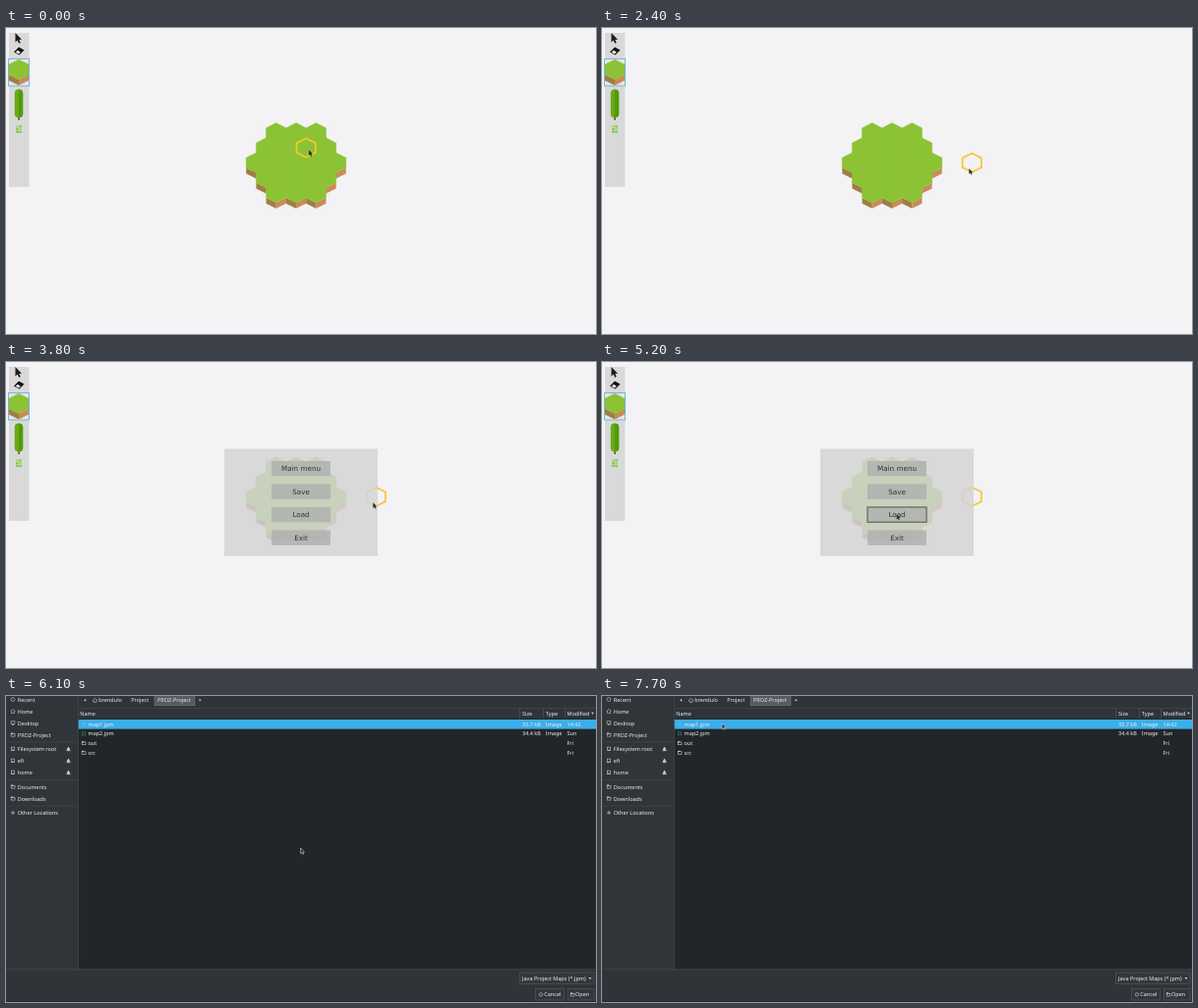
An HTML page with a canvas for the animation above (8 s loop, 600 by 312 pixels).

```html
<!DOCTYPE html>
<html lang="en">
<head>
<meta charset="utf-8">
<title>Hex map editor</title>
<style>
  html, body { margin: 0; width: 100%; height: 100%; overflow: hidden; background: #f3f2f4; }
  canvas { display: block; }
</style>
</head>
<body>
<canvas id="stage" width="600" height="312"></canvas>
<script>
const stage = document.getElementById('stage');
const ctx = stage.getContext('2d');
const layer = Object.assign(document.createElement('canvas'), { width: 600, height: 312 });
const LOOP = 8000, STEP = 100;
const HEX_W = 20.3, HEX_R = 10.15, ROW_H = 15.2, ORIGIN = [295, 137.4];
const UI_FONT = '5.5px "Noto Sans", sans-serif';
const MENU_FONT = '7.2px "DejaVu Sans", sans-serif';
const ICON = '#c4c8ca';
ctx.textRendering = 'geometricPrecision';

// Pointer strokes: evenly timed points between start and end.
const strokes = [
  { start: 0, end: 900, points: [[308, 124.5], [322, 100], [338, 76], [360, 98], [366, 125], [352, 155], [330, 170]] },
  { start: 900, end: 1400, points: [[330, 170], [345, 160], [362, 152], [373.3, 143.3]] },
  { start: 3900, end: 4800, points: [[373.3, 143.3], [350, 168], [322, 174], [300, 158], [322, 160]] },
  { start: 4800, end: 5200, points: [[322, 160], [302, 165], [277, 160], [299.6, 155]] },
  { start: 6200, end: 7100, points: [[299.6, 155], [240, 112], [165, 78], [100, 62]] },
  { start: 7100, end: 7700, points: [[100, 62], [106, 42], [122, 28]] }
];

const spline = (a, b, c, d, u) =>
  b + 0.5 * u * (c - a + u * (2 * a - 5 * b + 4 * c - d + u * (3 * (b - c) + d - a)));

function pointerAt(t) {
  const stroke = strokes.filter(s => t >= s.start).pop();
  const p = stroke.points, last = p.length - 1;
  const pos = Math.min(1, (t - stroke.start) / (stroke.end - stroke.start)) * last;
  const i = Math.min(last - 1, Math.floor(pos));
  const at = k => p[Math.max(0, Math.min(last, k))];
  return [0, 1].map(n => spline(at(i - 1)[n], at(i)[n], at(i + 1)[n], at(i + 2)[n], pos - i));
}

// Left edge of the sliding menu.
function menuX(t) {
  if (t < 2800) return 600;
  if (t < 2900) return 520;
  if (t < 3200) return 371;
  if (t < 3300) return 520;
  if (t < 3700) return 600;
  return t < 3800 ? 445 : 222;
}

function rect(x, y, w, h, color) {
  ctx.fillStyle = color;
  ctx.fillRect(x, y, w, h);
}

function frame(x, y, w, h, color, line = 1) {
  ctx.strokeStyle = color;
  ctx.lineWidth = line;
  ctx.strokeRect(x, y, w, h);
}

function ring(x, y, r, color) {
  ctx.beginPath();
  ctx.arc(x, y, r, 0, Math.PI * 2);
  ctx.strokeStyle = color;
  ctx.lineWidth = 0.6;
  ctx.stroke();
}

function pill(x, y, w, h, radii, color) {
  ctx.beginPath();
  ctx.roundRect(x, y, w, h, radii);
  ctx.fillStyle = color;
  ctx.fill();
}

function poly(points, fill, stroke, line = 1) {
  ctx.beginPath();
  points.forEach(([x, y]) => ctx.lineTo(x, y));
  ctx.closePath();
  if (fill) { ctx.fillStyle = fill; ctx.fill(); }
  if (stroke) { ctx.strokeStyle = stroke; ctx.lineWidth = line; ctx.stroke(); }
}

function label(text, x, y) {
  ctx.font = UI_FONT;
  ctx.textAlign = 'left';
  ctx.fillStyle = '#eceeef';
  ctx.fillText(text, x, y + 2);
}

const hexPoints = (x, y, r = HEX_R) =>
  [[0, -r], [r, -r / 2], [r, r / 2], [0, r], [-r, r / 2], [-r, -r / 2]].map(([a, b]) => [x + a, y + b]);

function tile(x, y, depth = 6) {
  const r = HEX_R;
  poly([[x - r, y + r / 2], [x, y + r], [x, y + r + depth], [x - r, y + r / 2 + depth]], '#a17d45');
  poly([[x + r, y + r / 2], [x, y + r], [x, y + r + depth], [x + r, y + r / 2 + depth]], '#c88c59');
  poly(hexPoints(x, y), '#8bc334', '#8bc334', 0.5);
}

function snapToHex([x, y]) {
  let best, bestDist = Infinity;
  const mid = Math.round((y - ORIGIN[1]) / ROW_H);
  for (let row = mid - 1; row <= mid + 1; row++) {
    const shift = ORIGIN[0] + (row & 1) * HEX_W / 2;
    const center = [shift + Math.round((x - shift) / HEX_W) * HEX_W, ORIGIN[1] + row * ROW_H];
    const dist = Math.hypot(center[0] - x, center[1] - y);
    if (dist < bestDist) { best = center; bestDist = dist; }
  }
  return best;
}

function arrow(x, y, scale, fill, stroke) {
  const shape = [[0, 0], [0, 7], [1.6, 5.6], [2.7, 8], [3.9, 7.4], [2.8, 5.2], [4.8, 5]];
  poly(shape.map(([a, b]) => [x + a * scale, y + b * scale]), fill, stroke, 0.6);
}

function toolbar() {
  rect(3, 5, 20.5, 157, '#d9d9da');
  arrow(9.5, 5, 1.35, '#1c1c1c');
  poly([[8, 24.5], [13, 19.5], [18.5, 22.5], [13.5, 27.5]], '#111');
  poly([[9.8, 24.8], [11.8, 22.8], [14.8, 24.8], [12.9, 26.6]], '#eee');
  rect(2.5, 31.5, 21, 27.5, '#e4e8ea');
  tile(13, 42.3);
  frame(2.5, 31.5, 21, 27.5, '#72b5dd');
  rect(12.2, 88, 1.8, 6, '#8a5a2c');
  pill(8.8, 62.5, 8.4, 29, 4, '#66ab12');
  pill(13, 62.7, 4.2, 28.6, [0, 4, 4, 0], '#529a0c');
  for (let i = 0; i < 6; i++)
    rect(10 + (i % 2) * 3.2, 99.3 + Math.floor(i / 2) * 2.8, 2.8, 2.2, i % 3 ? '#8bc84c' : '#a9d57c');
}

function menu(x, focused) {
  if (x >= 600) return;
  rect(x, 88.5, 156, 109.5, 'rgba(212,212,213,.835)');
  ['Main menu', 'Save', 'Load', 'Exit'].forEach((name, i) => {
    const y = 101 + i * 23.5;
    rect(x + 48, y, 60, 15.3, 'rgba(175,176,175,.82)');
    if (focused && name === 'Load') frame(x + 48, y, 60, 15.3, '#626563', 1.2);
    ctx.font = MENU_FONT;
    ctx.textAlign = 'center';
    ctx.fillStyle = '#333';
    ctx.fillText(name, x + 78, y + 10.2);
  });
}

function editor(t, pointer) {
  rect(0, 0, 600, 312, '#f3f2f4');
  toolbar();
  for (let row = -2; row <= 2; row++) {
    const count = 5 - Math.abs(row);
    for (let i = 0; i < count; i++)
      tile(ORIGIN[0] + (i - (count - 1) / 2) * HEX_W, ORIGIN[1] + row * ROW_H);
  }
  const [hx, hy] = snapToHex(t < 3900 ? pointer : pointerAt(1400));
  poly(hexPoints(hx, hy, 9.6), null, '#f9c52e', 1.7);
  menu(menuX(t), t >= 4500);
}

function folder(x, y) {
  frame(x - 1.8, y - 1.1, 3.8, 2.7, ICON, 0.6);
  rect(x - 2, y - 2, 2.2, 1.2, ICON);
}

function house(x, y) {
  poly([[x - 2.2, y], [x, y - 2], [x + 2.2, y], [x + 1.5, y], [x + 1.5, y + 2], [x - 1.5, y + 2], [x - 1.5, y]],
    null, ICON, 0.6);
}

function drive(x, y) {
  frame(x - 1.4, y - 1.9, 2.8, 3.6, ICON, 0.6);
  rect(x - 1.4, y + 0.8, 2.8, 0.9, ICON);
}

function desktop(x, y) {
  frame(x - 1.9, y - 1.7, 3.8, 2.6, ICON, 0.6);
  rect(x - 1.2, y + 1.5, 2.4, 0.6, ICON);
}

const recent = (x, y) => ring(x, y, 1.9, ICON);

function triangle(x, y, angle, size = 1) {
  const c = Math.cos(angle) * size, s = Math.sin(angle) * size;
  poly([[-1.3, -1], [1.3, -1], [0, 1]].map(([a, b]) => [x + a * c - b * s, y + a * s + b * c]), '#dfe2e3');
}

function sidebar() {
  rect(0, 0, 73, 279, '#30353a');
  const places = [['Recent', 3.5, recent], ['Home', 15.5, house], ['Desktop', 27.5, desktop],
    ['PROZ-Project', 39.5, folder], ['Filesystem root', 54, drive], ['efi', 66, drive], ['home', 78, drive],
    ['Documents', 92.5, folder], ['Downloads', 104.5, folder]];
  places.forEach(([name, y, icon]) => {
    label(name, 11.8, y);
    icon(7, y);
    if (icon === drive) {
      triangle(63.5, y - 0.7, Math.PI, 1.45);
      rect(61.6, y + 1.2, 3.8, 0.9, '#dfe2e3');
    }
  });
  rect(5, 118.7, 4, 0.7, ICON);
  rect(6.65, 117, 0.7, 4, ICON);
  label('Other Locations', 11.8, 119);
  [46.7, 85.3, 111.8].forEach(y => rect(0, y, 73, 0.6, '#41464a'));
}

function button(x, y, w, text, textX) {
  rect(x, y, w, 11.5, '#32373b');
  frame(x, y, w, 11.5, '#565b5f', 0.6);
  label(text, textX, y + 5.9);
}

function fileDialog() {
  rect(0, 0, 600, 312, '#2f3439');
  rect(73.5, 23, 526.5, 255.5, '#222629');
  sidebar();
  rect(73, 0, 0.7, 279, '#46494c');

  rect(151, 0, 41, 9.8, '#565b5f');
  frame(151, -1, 41, 10.8, '#777c80', 0.5);
  triangle(80.2, 4.2, Math.PI / 2);
  triangle(197.6, 4.2, -Math.PI / 2);
  house(90.5, 4.3);
  label('brendulo', 94.3, 4.2);
  label('Project', 127.2, 4.2);
  label('PROZ-Project', 154, 4.2);

  rect(73.5, 12.3, 526.5, 0.6, '#484d51');
  const columns = [83.5, 525, 548.8, 570.5];
  ['Name', 'Size', 'Type', 'Modified'].forEach((name, i) => label(name, i ? columns[i] : 75.3, 17.6));
  triangle(596.5, 17.8, 0);
  [522, 546, 568].forEach(x => rect(x, 13, 0.6, 10, '#555a5e'));

  rect(73.7, 24, 526.3, 9.6, '#3caee8');
  [['map1.jpm', '35.7 kB', 'Image', '14:42'], ['map2.jpm', '34.4 kB', 'Image', 'Sun'],
    ['out', '', '', 'Fri'], ['src', '', '', 'Fri']].forEach((cells, i) => {
    const y = 28.6 + i * 9.75;
    cells.forEach((cell, n) => label(cell, columns[n], y));
    if (i > 1) folder(79, y);
    else frame(77.4, y - 1.5, 3, 3, i ? '#3f8f60' : '#63bde9', 0.6);
  });

  rect(0, 278.5, 600, 0.7, '#484d51');
  button(522.5, 282, 75.5, 'Java Project Maps (*.jpm)', 525);
  triangle(594, 288, 0);
  button(538.5, 298.5, 29, 'Cancel', 547.3);
  button(571.5, 298.5, 26.5, 'Open', 579);
  ring(544, 304.4, 1.7, '#d0d3d5');
  folder(576, 304.4);
  rect(0, 311, 600, 1, '#2b2430');
}

// The dialog is flattened first so that it fades in as one sheet.
function dialogOver(t, pointer) {
  fileDialog();
  layer.getContext('2d').drawImage(stage, 0, 0);
  editor(t, pointer);
  ctx.globalAlpha = 0.75;
  ctx.drawImage(layer, 0, 0);
  ctx.globalAlpha = 1;
}

function draw(now) {
  const t = Math.floor(now % LOOP / STEP) * STEP;
  const pointer = pointerAt(t);
  if (t < 6000) {
    editor(t, pointer);
    arrow(...pointer, 0.8, '#2a2a2a');
    return;
  }
  if (t < 6100) dialogOver(t, pointer);
  else fileDialog();
  arrow(...pointer, 0.8, '#26292c', '#c9cccd');
}

const begun = performance.now();
function tick() {
  draw(performance.now() - begun);
  requestAnimationFrame(tick);
}
tick();
</script>
</body>
</html>
```
